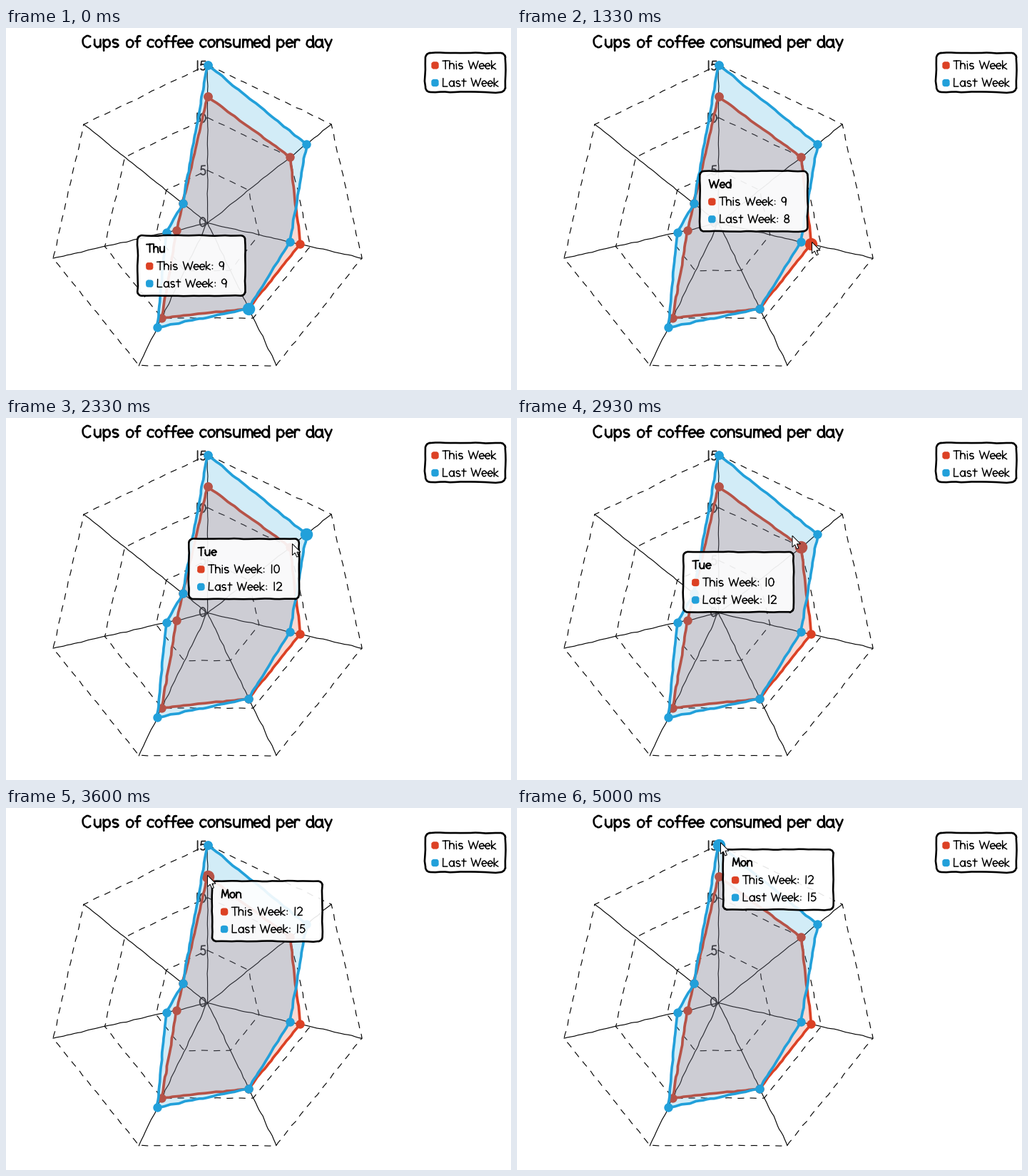
Recreate the animation shown at these times as a matplotlib script. Size 708x508 px, loop 5.12 s.

```python
import numpy as np
import matplotlib.pyplot as plt
from matplotlib.animation import FuncAnimation
from matplotlib.patches import PathPatch, Polygon
from matplotlib.path import Path
from matplotlib.transforms import Affine2D

W, H, DPI = 708, 508, 100
LOOP, INTERVAL = 5120, 20
PX = 72 / DPI
RED, BLUE = "#dc4124", "#22a0da"
rng = np.random.default_rng(7)

fig = plt.figure(figsize=(W / DPI, H / DPI), dpi=DPI, facecolor="white")
ax = fig.add_axes([0, 0, 1, 1])
ax.set(xlim=(0, W), ylim=(H, 0))
ax.axis("off")


# Geometry ------------------------------------------------------------

def arc(cx, cy, rx, ry, start=0, end=360):
    a = np.radians(np.linspace(start, end, 18))
    return np.column_stack([cx + rx * np.cos(a), cy + ry * np.sin(a)])


def line(*xy):
    return np.array(xy, float).reshape(-1, 2)


def stem(x, top):
    return line(x, top, x, 0)


def hump(cx, r, y=6.8, end=0):
    return arc(cx, y, r, 10.9 - y, 180, end)


def rounded_box(w, h, r):
    corners = [(w - r, r), (w - r, h - r), (r, h - r), (r, r)]
    pts = [arc(x, y, r, r, 90 * i - 90, 90 * i)
           for i, (x, y) in enumerate(corners)]
    return np.vstack(pts + [pts[0][:1]])


def wobble(points, amount=0.7, gap=5):
    """Resample a polyline and shake it like a pen line; corners stay put."""
    points = np.asarray(points, float)
    out = [points[:1]]
    for a, b in zip(points[:-1], points[1:]):
        n = max(int(np.hypot(*(b - a)) / gap), 1)
        u = np.linspace(0, 1, n + 1)[1:, None]
        noise = rng.normal(0, amount, (n, 2))
        noise[1:] = (noise[1:] + noise[:-1]) / 2
        noise[-1] *= 0.3
        out.append(a + (b - a) * u + noise)
    return np.vstack(out)


# Pen lettering: advance width, then strokes (cap height 16, x-height 11)

BOWL = arc(5.6, 5.4, 4.6, 5.3)
ARCH = [hump(5.8, 4.2), stem(10, 6.8)]
LOWER = {
    "u": (13, line(1.5, 11, 1.5, 4.5), arc(5.7, 4.5, 4.2, 4.3, 180, 360), stem(10, 11)),
    "p": (13, line(1.5, 11, 1.5, -5), arc(6, 5.5, 4.5, 5.3)),
    "s": (11.5, arc(5, 8.2, 3.7, 2.7, 40, 270), arc(5, 2.8, 3.9, 2.7, 90, -140)),
    "o": (12, BOWL),
    "f": (9.7, arc(7, 12.5, 3, 3.5, 55, 180), stem(4, 12.5), line(1, 8.7, 8, 8.7)),
    "c": (11, arc(5.8, 5.5, 4.8, 5.3, 50, 310)),
    "e": (11.6, line(1, 5.2, 10.1, 6.2), arc(5.6, 5.5, 4.6, 5.3, 6, 315)),
    "n": (12, stem(1.5, 11), *ARCH),
    "m": (16, stem(1.5, 11), hump(4.7, 3.2), stem(7.9, 6.8),
          hump(11.1, 3.2), stem(14.3, 6.8)),
    "d": (12.5, BOWL, stem(10.3, 16)),
    "r": (9, stem(1.5, 11), hump(5.5, 4, end=50)),
    "a": (13, BOWL, line(10.3, 11, 10.3, 1.2, 11.6, 0)),
    "y": (12.5, line(1.5, 11, 5.8, 2), line(10.5, 11, 4, -5)),
    "h": (12, stem(1.5, 16), *ARCH),
    "i": (6, stem(2.5, 10.5), line(2.5, 14.5, 2.5, 15)),
    "k": (11, stem(1.5, 16), line(9, 10.5, 1.8, 4.6, 9.8, 0)),
    "t": (10, stem(4.5, 15), line(0.8, 10.6, 9, 10.6)),
}
UPPER = {
    "C": (16, arc(7.7, 8, 6.6, 8, 50, 310)),
    "T": (13, line(0.5, 15.4, 12.4, 16), stem(6.6, 15.8)),
    "W": (21, line(1, 16, 5.5, 0, 10, 13, 14.5, 0, 19.5, 16)),
    "L": (13, line(2, 16, 1.5, 0.3, 10.5, 0.3)),
    "M": (16.5, line(1.2, 0, 3.2, 16, 8.2, 4, 13, 16, 15, 0)),
}
MARKS = {
    " ": (8,),
    ":": (7, line(3, 2, 3, 2.5), line(3, 8.5, 3, 9)),
    "0": (12.5, arc(6, 8, 5, 7.8)),
    "1": (7, stem(3.2, 16)),
    "2": (12, arc(5.5, 11.5, 4.5, 4.3, 160, -35), line(9.2, 9, 1, 0.3, 10.5, 0.3)),
    "5": (11.5, line(9.5, 15.8, 3, 15.8, 2, 9), arc(5.2, 5.2, 4.6, 5, 130, -140)),
    "8": (12, arc(6, 11.8, 3.7, 3.9), arc(6, 4, 4.6, 4)),
    "9": (12, arc(5.5, 11, 4.3, 4.7), line(9.8, 11.5, 8.6, 0)),
}
GLYPHS = {**LOWER, **UPPER, **MARKS}


def write(text, x, y, scale, width, z, color="black", align="left"):
    if align == "right":
        x -= scale * sum(GLYPHS[ch][0] for ch in text)
    paths = []
    for ch in text:
        advance, *strokes = GLYPHS[ch]
        paths += [Path((s + rng.normal(0, 0.2, s.shape)) * (scale, -scale) + (x, y))
                  for s in strokes]
        x += advance * scale
    return ax.add_patch(PathPatch(
        Path.make_compound_path(*paths), fill=False, ec=color, lw=width * PX,
        capstyle="round", joinstyle="round", zorder=z))


def draw_box(x, y, w, h, r, z, face, width=0.0):
    pts = wobble(rounded_box(w, h, r), 0.4, 7) + (x, y)
    pts[-1] = pts[0]
    return ax.add_patch(Polygon(
        pts, fc=face, ec="black" if width else "none", lw=width * PX,
        joinstyle="round", zorder=z))


def key_rows(x, y, values, z):
    """Coloured squares with their labels, (x, y) being the first square's centre."""
    parts = []
    for i, (name, color) in enumerate([("This Week", RED), ("Last Week", BLUE)]):
        cy = y + 24.5 * i
        label = f"{name}: {values[i]}" if values else name
        parts.append(draw_box(x - 5.2, cy - 5.2, 10.4, 10.4, 3.5, z, color))
        parts.append(write(label, x + 10, cy + 5, 0.72, 1.5, z))
    return parts


# Chart ---------------------------------------------------------------

CENTER, UNIT, SIDES = np.array([282.5, 273.7]), 14.8, 7


def spot(day, value):
    a = 2 * np.pi * day / SIDES
    return CENTER + value * UNIT * np.array([np.sin(a), -np.cos(a)])


def ring(values):
    return np.array([spot(d % SIDES, values[d % SIDES]) for d in range(SIDES + 1)])


for level in (5, 10, 15):
    ax.plot(*wobble(ring([level] * SIDES), 0.45).T, color="black", lw=1.15 * PX,
            ls=(0, (8, 7)), zorder=1)
for day in range(SIDES):
    ax.plot(*wobble([CENTER, spot(day, 15)], 0.45).T, color="black",
            lw=1.15 * PX, zorder=1)
for value, base in zip((0, 5, 10, 15), (278.5, 206, 132.5, 59)):
    write(str(value), 281, base, 0.8, 1.8, 1.5, "#222222", "right")

SERIES = [([12, 10, 9, 9, 10, 3, 3], RED), ([15, 12, 8, 9, 11, 4, 3], BLUE)]
focus = []
for z, (values, color) in enumerate(SERIES, 2):
    corners = ring(values)
    outline = wobble(corners, 0.5, 5)
    ax.add_patch(Polygon(outline, fc=color, alpha=0.2, ec="none", zorder=z))
    ax.plot(*outline.T, color=color, lw=3.7 * PX, zorder=z + 0.1,
            solid_joinstyle="round")
    ax.plot(*corners.T, "o", color=color, ms=12.4 * PX, mew=0, zorder=z + 0.2)
    focus += ax.plot([], [], "o", color=color, ms=17.5 * PX, mew=0, zorder=z + 0.3)

write("Cups of coffee consumed per day", 106.5, 27, 1, 2.6, 4)
draw_box(588, 35, 112, 55, 7, 4, "white", 2.6)
key_rows(601.5, 52.5, None, 4)


# Tooltip and pointer -------------------------------------------------

DAYS = ["Mon", "Tue", "Wed", "Thu"]


def tip_width(day):
    return 154.5 if SERIES[0][0][day] >= 10 else 151


def tip_place(day, series):
    x, y = spot(day, SERIES[series][0][day])
    if day == 0:
        return np.array([x + 6.5, y + 6.5])
    if day == 1:
        return np.array([x - 10.5 - tip_width(day), y + 6.5])
    return np.array([x - 5 - tip_width(day), y - 102.5])


tips = []
for day, name in enumerate(DAYS):
    values = [SERIES[0][0][day], SERIES[1][0][day]]
    tips.append([draw_box(0, 0, tip_width(day), 84.5, 6, 5, (1, 1, 1, 0.9), 2.6),
                 write(name, 12.5, 23.5, 0.72, 2.0, 5.1),
                 *key_rows(17, 43, values, 5.1)])

pointer = ax.add_patch(Polygon(
    line(0, 0, 0, 16, 3.7, 12.6, 6.3, 18.5, 8.9, 17.4, 6.4, 11.6, 11.5, 11.6),
    fc="white", ec="black", lw=1 * PX, zorder=6))

# start time, day, series
HOVERS = [(-500, 3, 1), (530, 2, 1), (1195, 2, 0), (1860, 1, 1),
          (2460, 1, 0), (3460, 0, 0), (4460, 0, 1)]
# time, x, y of the pointer's tip
TRAIL = np.array([
    (860, 399, 301), (1330, 413, 300), (1500, 414, 295), (2000, 422, 163),
    (2330, 401, 176), (2660, 397, 182), (2870, 397, 182), (2930, 386, 165),
    (3600, 282, 94), (3730, 283, 97), (3870, 283, 97), (4660, 284, 51),
    (4940, 284, 51), (5000, 285, 48)])
STEP = 1000 / 15


def moved(xy):
    return Affine2D().translate(*xy) + ax.transData


def update(frame):
    time = int((frame * INTERVAL + 15) / STEP) * STEP
    index = max(i for i, h in enumerate(HOVERS) if h[0] <= time)
    start, day, series = HOVERS[index]

    left = 1 - min((time - start + STEP) / (3 * STEP), 1)
    before = HOVERS[max(index - 1, 0)]
    place = tip_place(day, series)
    place = place + (tip_place(*before[1:]) - place) * left ** 2
    for d, parts in enumerate(tips):
        for part in parts:
            part.set_visible(d == day)
            part.set_transform(moved(place))

    for s, dot in enumerate(focus):
        x, y = spot(day, SERIES[s][0][day])
        dot.set_data([x], [y])
        dot.set_visible(s == series)

    pointer.set_visible(time > 850)
    pointer.set_transform(moved([np.interp(time, TRAIL[:, 0], TRAIL[:, k]) + 0.5
                                 for k in (1, 2)]))
    return []


anim = FuncAnimation(fig, update, frames=LOOP // INTERVAL, interval=INTERVAL,
                     repeat=True, cache_frame_data=False)
plt.show()
```
